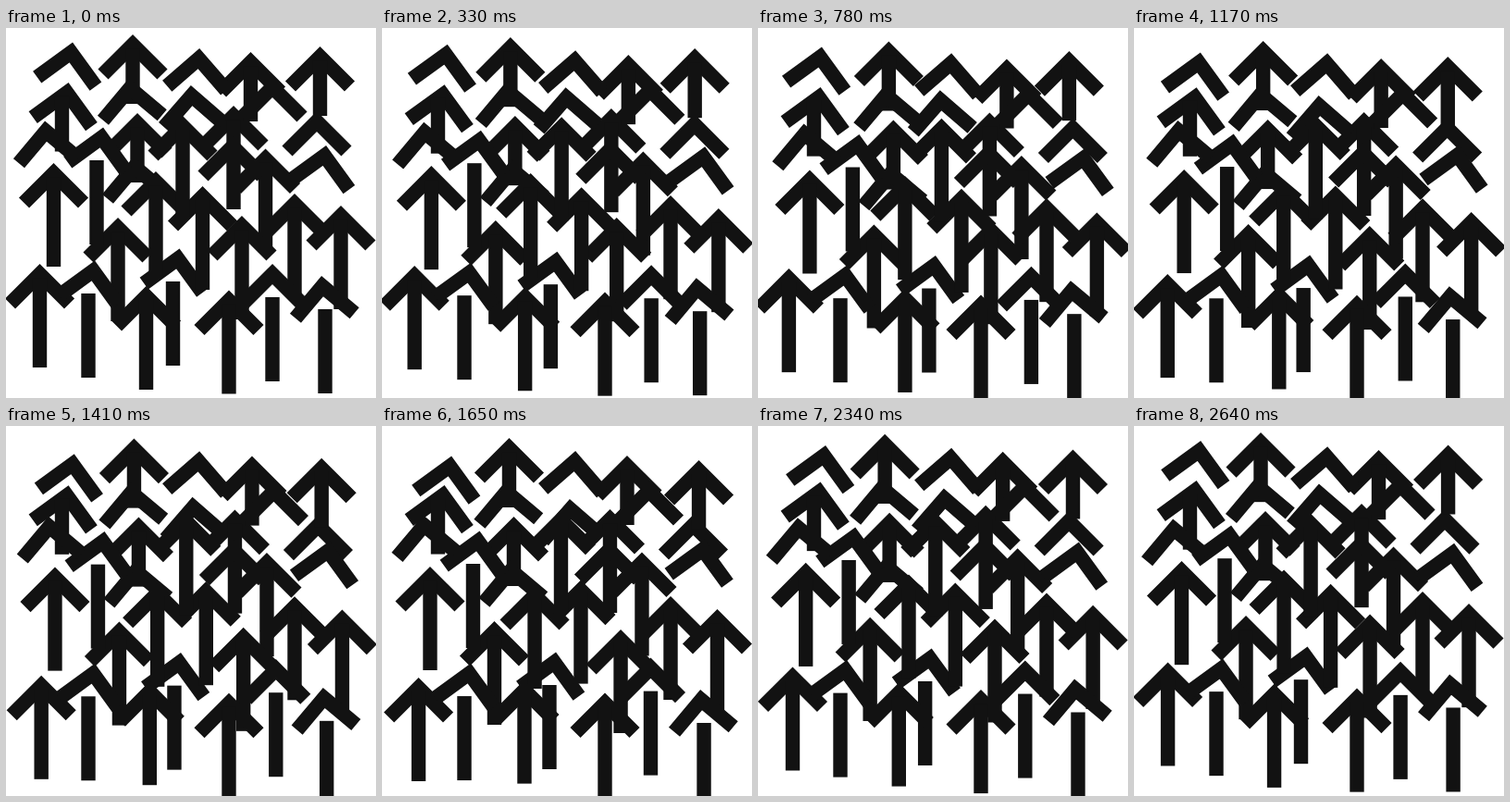
These frames come from a looping animation (400x400 px, 2670 ms). An HTML page with a canvas:

```html
<!DOCTYPE html>
<html lang="en">
<head>
<meta charset="utf-8">
<title>Arrows</title>
<style>
  html, body { margin: 0; width: 100%; height: 100%; overflow: hidden; background: #fff; }
  canvas { display: block; }
</style>
</head>
<body>
<canvas id="stage" width="400" height="400"></canvas>
<script>
const ctx = document.getElementById('stage').getContext('2d');
const LOOP = 2670;

function head(x, y, tilt = 0) {
  ctx.save();
  ctx.translate(x, y + 45);
  ctx.rotate(tilt * Math.PI / 180);
  ctx.beginPath();
  ctx.moveTo(-32, -2);
  ctx.lineTo(0, -34);
  ctx.lineTo(32, -2);
  ctx.stroke();
  ctx.restore();
}

const shaft = (x, y, from, to) => ctx.fillRect(x - 7.7, y + from, 15.4, to - from);

// Every shape hangs below a tip (x, y); its head may be tilted.
const shapes = {
  chevron: head,
  arrow(x, y) { head(x, y); shaft(x, y, 15, 112); },
  stub(x, y, tilt) { head(x, y, tilt); shaft(x, y, 15, 75); },
  split(x, y, tilt) { head(x, y, tilt); shaft(x, y, 36, 127); },
  double(x, y) { head(x, y); shaft(x, y, 15, 75); head(x, y + 47, -5); }
};

// Each flock drifts in straight lines: home -> a -> b -> home.
const flocks = [
  { a: [4.5, 7.7], b: [0.5, 6.3],
    arrow: [[51.5, 146], [246, 84], [280.5, 130.5], [121, 205], [362, 192]],
    double: [[137, 7], [142, 92]],
    stub: [[264.5, 26]],
    split: [[98, 107, 9], [180.5, 238, 9]],
    chevron: [[288, 53], [336, 90], [245, 117]] },
  { a: [-3.2, 5.3], b: [3.2, 17.8],
    arrow: [[36.5, 255], [162, 155], [255, 203]],
    stub: [[339.5, 20]],
    split: [[345, 268, -5]],
    chevron: [[65, 15, 9], [203, 62, -4]] },
  { a: [0, 5.3], b: [0, 5.3],
    arrow: [[241, 283.5], [312, 179]],
    stub: [[60.5, 58.5, 9]],
    split: [[89, 251, 9]],
    chevron: [[206, 22, 4]] },
  { a: [7.6, 3], b: [2.6, -4.6],
    arrow: [[212.5, 171], [151.5, 279], [191, 95]],
    split: [[288, 255]],
    chevron: [[339, 126.5, 9], [46, 100.5, -5]] }
];

const HOME = [0, 0];
const mix = (from, to, k) => from.map((v, i) => v + (to[i] - v) * k);

function drift(a, b, p) {
  if (p < 0.3) return mix(HOME, a, p / 0.3);
  if (p < 0.6) return mix(a, b, (p - 0.3) / 0.3);
  return mix(b, HOME, (p - 0.6) / 0.4);
}

function draw(now) {
  const p = now % LOOP / LOOP;
  ctx.fillStyle = '#fff';
  ctx.fillRect(0, 0, 400, 400);
  ctx.fillStyle = ctx.strokeStyle = '#121212';
  ctx.lineWidth = 15.7;
  for (const { a, b, ...members } of flocks) {
    ctx.save();
    ctx.translate(...drift(a, b, p));
    for (const kind in members)
      for (const tip of members[kind]) shapes[kind](...tip);
    ctx.restore();
  }
}

const start = performance.now();
function tick() {
  draw(performance.now() - start);
  requestAnimationFrame(tick);
}
tick();
</script>
</body>
</html>
```
